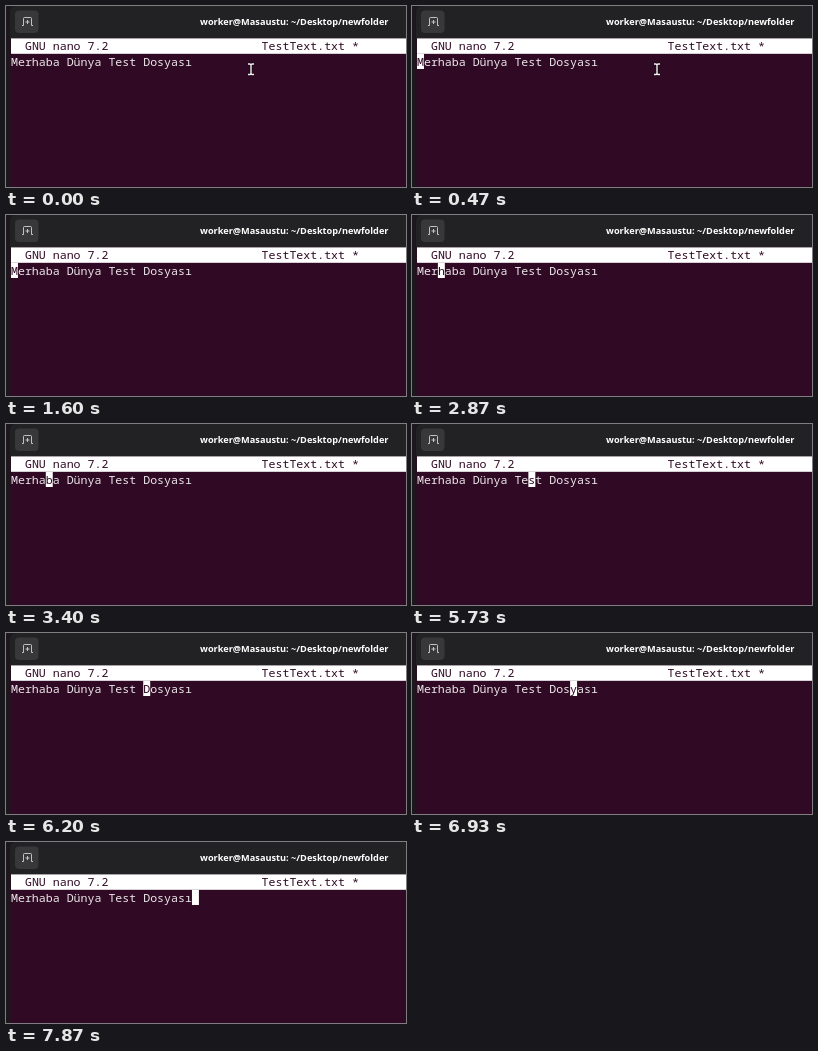
Animation, 400 px wide and 181 px high, one loop 8 s. Source, as an HTML page with a canvas:

```html
<!DOCTYPE html>
<html lang="tr">
<head>
<meta charset="utf-8">
<title>Terminal</title>
<style>
  html, body { margin: 0; width: 100%; height: 100%; overflow: hidden; background: #300a24; }
  canvas { display: block; width: 400px; height: 181px; }
</style>
</head>
<body>
<canvas id="stage" width="400" height="181"></canvas>
<script>
const ctx = document.getElementById('stage').getContext('2d');
const LOOP = 8000;
const PURPLE = '#300a24', WHITE = '#ffffff', PALE = '#ece8ea';
const LEFT = 5, CELL = 6.96;
const BAR_TOP = 32.4, BAR_BOTTOM = 47.8;
const MONO = '11.6px "Noto Sans Mono", monospace';
const TITLE = '700 9.2px "Open Sans", sans-serif';
const LINE = 'Merhaba Dünya Test Dosyası';
const BLINK = 730, BLINK_END = 1600, POINTER_GONE = 1330;

// Bursts of arrow-key presses; each one steps evenly between two columns
const bursts = [
  { start: 2470, end: 3400, from: 2, to: 5 },
  { start: 4130, end: 4400, from: 10, to: 12 },
  { start: 4730, end: 4930, from: 13, to: 15 },
  { start: 5730, end: 6200, from: 16, to: 19 },
  { start: 6470, end: 7850, from: 20, to: 26 }
];

function cursorColumn(t) {
  const burst = bursts.findLast(b => b.start <= t);
  if (!burst) return 0;
  const { start, end, from, to } = burst;
  const progress = Math.min(1, (t - start) / (end - start));
  return from + Math.floor((to - from) * progress + 1e-6);
}

function cursorVisible(t) {
  return t >= BLINK_END || Math.floor((BLINK_END - t) / BLINK + 1e-6) === 1
    && t < BLINK_END - BLINK;
}

function rect(x, y, w, h, color) {
  ctx.fillStyle = color;
  ctx.fillRect(x, y, w, h);
}

function roundRect(x, y, w, h, radii, color) {
  ctx.fillStyle = color;
  ctx.beginPath();
  ctx.roundRect(x, y, w, h, radii);
  ctx.fill();
}

function text(str, x, y, color, font = MONO, align = 'left') {
  ctx.font = font;
  ctx.textAlign = align;
  ctx.fillStyle = color;
  ctx.fillText(str, x, y);
}

function stroke(path, color, width) {
  ctx.strokeStyle = color;
  ctx.lineWidth = width;
  ctx.stroke(new Path2D(path));
}

function drawWindow() {
  rect(0, 0, 400, 181, PURPLE);
  rect(0, 0, 4.5, 181, '#1c171c');
  rect(0, 0, 400, BAR_TOP, '#1c171c');
  roundRect(4, 0, 396, BAR_TOP, [6, 0, 0, 0], '#222224');
}

function drawTitle() {
  roundRect(9, 4.5, 23.5, 22.5, 4, '#38383a');
  stroke('M16 19.5H17.5V12.5Q17.5 11.5 18.5 11.5H24.5Q25.5 11.5 25.5 12.5V19.5H27', '#d2d2d2', 0.9);
  stroke('M21.5 14V18M19.5 16H23.5', '#d2d2d2', 0.9);
  text('worker@Masaustu: ~/Desktop/newfolder', 382.5, 19.3, WHITE, TITLE, 'right');
}

function drawEditor() {
  rect(LEFT, BAR_TOP, 395, BAR_BOTTOM - BAR_TOP, WHITE);
  text('GNU nano 7.2', LEFT + 2 * CELL, 44, PURPLE);
  text('TestText.txt *', LEFT + 36 * CELL, 44, PURPLE);
  text(LINE, LEFT, 59.8, PALE);
}

function drawCursor(t) {
  if (!cursorVisible(t)) return;
  const col = cursorColumn(t);
  const x = LEFT + col * CELL;
  rect(x, BAR_BOTTOM, CELL, 15.2, WHITE);
  text(LINE[col] || '', x, 59.8, PURPLE);
}

function drawPointer() {
  const beam = 'M242 58H244L245 59L246 58H248M245 59V67.5M242 68.5H244L245 67.5L246 68.5H248';
  stroke(beam, '#16080f', 3);
  stroke(beam, '#f4f0f2', 1.4);
}

function frame(now) {
  const t = now % LOOP;
  drawWindow();
  drawTitle();
  drawEditor();
  drawCursor(t);
  if (t < POINTER_GONE) drawPointer();
  requestAnimationFrame(frame);
}
requestAnimationFrame(frame);
</script>
</body>
</html>
```
